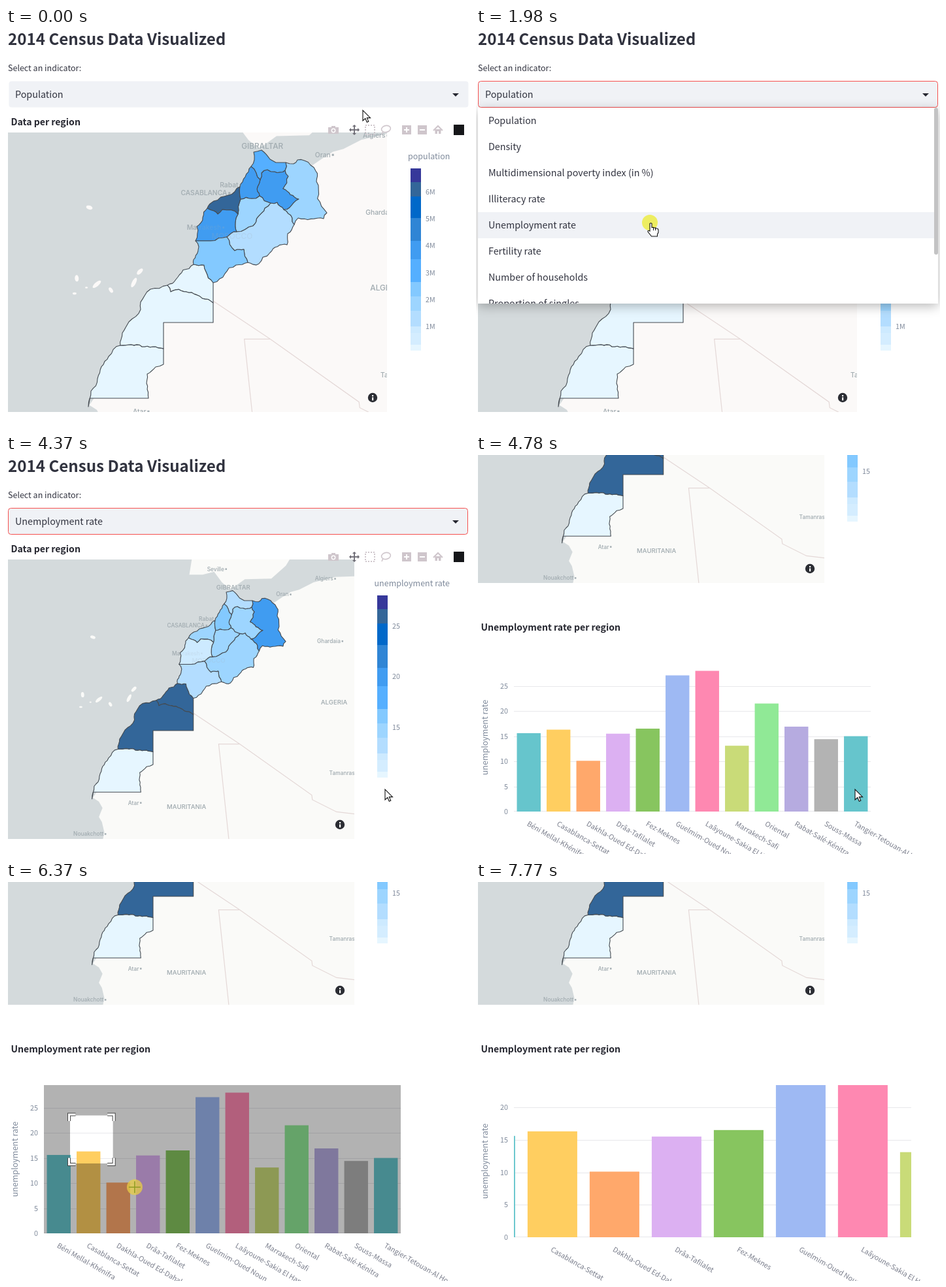
Recreate the animation shown at these times as an HTML page with a canvas. Size 710 by 611 pixels, loop 8000 ms.

```html
<!DOCTYPE html>
<html lang="en">
<head>
<meta charset="utf-8">
<title>2014 Census Data Visualized</title>
<style>
html, body { margin: 0; width: 100%; height: 100%; overflow: hidden; background: #fff; }
canvas { display: block; width: 710px; height: 611px; }
</style>
</head>
<body>
<canvas id="stage" width="710" height="611"></canvas>
<script>
const ctx = document.getElementById('stage').getContext('2d');
const LOOP = 8000;
const SANS = '"Noto Sans CJK JP", "Noto Sans CJK SC", "Noto Sans CJK", "Source Sans Pro", "Noto Sans", sans-serif';
const LABEL = 'Inter, "Open Sans", sans-serif';
const INK = '#31333f', MUTED = '#7f8a9b';

const clamp = (v, a = 0, b = 1) => Math.min(b, Math.max(a, v));
const ramp = (t, a, b) => clamp((t - a) / (b - a));
const smooth = u => u * u * (3 - 2 * u);

function text(s, x, y, size, color = INK, align = 'left', weight = 400) {
  ctx.font = `${weight} ${size}px ${SANS}`;
  ctx.fillStyle = color;
  ctx.textAlign = align;
  ctx.fillText(s, x, y);
}

function rect(x, y, w, h, color) {
  ctx.fillStyle = color;
  ctx.fillRect(x, y, w, h);
}

function line(color, width, ...p) {
  ctx.beginPath();
  for (let i = 0; i < p.length; i += 2) ctx.lineTo(p[i], p[i + 1]);
  ctx.strokeStyle = color;
  ctx.lineWidth = width;
  ctx.stroke();
}

function disc(x, y, r, color) {
  ctx.beginPath();
  ctx.arc(x, y, r, 0, 7);
  ctx.fillStyle = color;
  ctx.fill();
}

function group(fn) {
  ctx.save();
  fn();
  ctx.restore();
}

function clip(x, y, w, h) {
  ctx.beginPath();
  ctx.rect(x, y, w, h);
  ctx.clip();
}

// ---- data: name, jobless rate, population in millions, colour, corners on the map ----
const regions = [
  ['Béni Mellal-Khénifra', 15.6, 2.52, '#66c5cc', 'EFLKI'],
  ['Casablanca-Settat', 16.3, 6.86, '#ffce60', 'GFLM'],
  ['Dakhla-Oued Ed-Dahab', 10.1, 0.14, '#ffa86b', 'UVW'],
  ['Drâa-Tafilalet', 15.5, 1.64, '#dcb0f2', 'HJPNKI'],
  ['Fez-Meknes', 16.5, 4.24, '#87c55f', 'CHIED'],
  ['Guelmim-Oued Noun', 27.1, 0.43, '#9eb9f3', 'QRTS'],
  ['Laâyoune-Sakia El Hamra', 28, 0.37, '#fe88b1', 'STVU'],
  ['Marrakech-Safi', 13.1, 4.52, '#c9db78', 'MLKNO'],
  ['Oriental', 21.5, 2.31, '#90e996', 'BJHC'],
  ['Rabat-Salé-Kénitra', 16.9, 4.58, '#b6abe0', 'ADEFG'],
  ['Souss-Massa', 14.4, 2.68, '#b3b3b3', 'ONPRQ'],
  ['Tangier-Tetouan-Al Hoceima', 15, 3.56, '#66c5cc', 'ABCD']
].map(([name, rate, people, color, corners]) => ({ name, rate, people, color, corners }));

// ---- colour scale, from high to low ----
const shades = ['#36389a', '#336699', '#0068c9', '#2f85d5', '#409cf1', '#55afff',
  '#83c9ff', '#9dd5ff', '#b3ddff', '#cdeaff', '#d4edff', '#e6f6ff'];
const cuts = [0, 0.075, 0.155, 0.275, 0.4, 0.5, 0.625, 0.705, 0.785, 0.87, 0.905, 0.97, 1];

const views = [
  { key: 'people', title: 'population', tx: 615, bar: 619, step: 1, unit: 'M', w: 580, k: 1, dx: 0, dy: 0, land: '#fbf9f8' },
  { key: 'rate', title: 'unemployment rate', tx: 563.5, bar: 568, step: 5, unit: '', w: 530, k: 0.812, dx: 29.3, dy: 55.8, land: '#fafaf8' }
];
for (const v of views) {
  const all = regions.map(r => r[v.key]);
  v.hi = Math.max(...all);
  v.lo = Math.min(...all);
  v.depth = n => (v.hi - n) / (v.hi - v.lo);
  // Translucent fills on the map look one shade lighter than the scale.
  v.fill = n => shades[Math.min(cuts.findLastIndex(c => c <= v.depth(n)) + 1, 11)];
}

function colorBar(v) {
  const y = d => 215 + d * 278;
  text(v.title, v.tx, 201, 12.5, MUTED);
  shades.forEach((c, i) => rect(v.bar, Math.round(y(cuts[i])), 16, Math.ceil(y(cuts[i + 1]) - y(cuts[i])), c));
  for (let n = Math.ceil(v.lo / v.step) * v.step; n < v.hi; n += v.step)
    text(n + v.unit, v.bar + 23, y(v.depth(n)) + 4, 10.75, MUTED);
}

// ---- map ----
const points = s => s ? s.split(' ').map(p => p.split(',').map(Number)) : [];

// Mercator, longitude and latitude in degrees.
function project([lon, lat]) {
  const m = Math.log(Math.tan(Math.PI / 4 + lat * Math.PI / 360)) * 180 / Math.PI;
  return [514 + lon * 22.73, 1063.5 - m * 22.73];
}

let seed = 7;
function random() {
  seed = (seed * 16807) % 2147483647;
  return seed / 2147483647;
}

// Fractal line; edges along an axis stay straight.
function rough(a, b) {
  const dx = b[0] - a[0], dy = b[1] - a[1];
  if (!dx || !dy || Math.hypot(dx, dy) < 7) return [b];
  const n = (random() - 0.5) * 0.3;
  const mid = [a[0] + dx / 2 - dy * n, a[1] + dy / 2 + dx * n];
  return [...rough(a, mid), ...rough(mid, b)];
}

const corners = points('375,212 428,206 427,218 389,232 388,257 359,262 358,243 425,278 405,268 441,301 353,312 355,285 308,276 338,320 290,326 370,359 287,362 317,390 247,394 317,421 175,486 241,491 218,567');
const bends = {
  AB: '379,190 391,187 404,201 413,206', CD: '411,220 400,217 391,222', DA: '383,222', AG: '366,228',
  DE: '385,243', EF: '376,261', CH: '432,227 424,246 448,262 434,275', HI: '415,267',
  BJ: '440,208 446,202 466,210 474,219 475,235 491,283 486,292 447,291', JH: '438,291',
  IK: '396,276 378,303', JP: '431,315 430,332 404,344 393,351 387,361', PN: '364,339 350,341',
  LK: '351,297', ML: '318,280 324,285 331,278', GM: '340,256 318,265', MO: '301,290 292,304',
  ON: '313,326', OQ: '295,335', QR: '303,363 306,373', RP: '352,363', QS: '260,385',
  ST: '252,404 284,405', SU: '221,400 212,410 206,431 188,450 178,467', TV: '317,451 241,451',
  UV: '208,488', VW: '241,515 229,519 216,530', WU: '128,567 126,580 130,556 140,537 157,503'
};
const corner = c => corners[c.charCodeAt(0) - 65];
const arcs = {};

function arc(a, b) {
  if (arcs[b + a]) return [...arcs[b + a]].reverse();
  if (!arcs[a + b]) {
    const turns = bends[a + b] ? points(bends[a + b]) : points(bends[b + a]).reverse();
    const stops = [corner(a), ...turns, corner(b)];
    arcs[a + b] = stops.flatMap((p, i) => i ? rough(stops[i - 1], p) : [p]);
  }
  return arcs[a + b];
}

function shape(pts) {
  const path = new Path2D();
  pts.forEach(p => path.lineTo(...p));
  path.closePath();
  return path;
}

for (const r of regions) {
  const c = [...r.corners];
  r.path = shape(c.flatMap((a, i) => arc(a, c[(i + 1) % c.length])));
}

const coasts = [
  '-5.4,35.6 -4,35.1 -2.9,35.2 -2.1,35.05 -1.2,35.55 -0.6,35.85 0.1,36 1.3,36.5 3.1,36.85 5,36.9 9,37 9,14 -16.5,14 -16.5,16 -16.05,18.2 -16.25,19 -16.5,19.4 -16.2,20.1 -16.5,20.6 -17,20.9 -16.5,21.6 -13,24 -12.6,26.3 -9.5,28.7 -9,30.4 -8.5,32 -6,34.7',
  '-8.8,40 -8.8,38 -9,37 -7.9,37 -6.95,37.2 -6.3,36.5 -5.6,36 -4.4,36.7 -2.2,36.75 -1,37.6 -0.3,38.5 0,40'
].map(s => shape(points(s).map(project)));

// Islands: place, half length, tilt.
const islands = [[-18, 27.75, 3, 0], [-17.85, 28.65, 5, 1.5], [-17.2, 28.1, 2, 0], [-16.5, 28.3, 8, -0.7],
  [-15.55, 27.95, 4.5, 1], [-14, 28.4, 8, -1.1], [-13.6, 29.05, 6, -0.8], [-17, 32.75, 5, 0.3]];
const frontiers = ['-8.67,27.3 -4.83,25 1.15,21.1 1.2,20.74 3.2,19.8 6,19.5', '-4.83,25 -6.57,25 -5.6,16.5']
  .map(s => points(s).flatMap(project));
const cities = { Seville: [-5.98, 37.39], Algiers: [3.06, 36.75], Oran: [-0.63, 35.7], Rabat: [-6.84, 34.02],
  CASABLANCA: [-7.6, 33.58], Marrakesh: [-8, 31.63], Ghardaia: [3.67, 32.49], Tamanrasset: [5.52, 22.79],
  Atar: [-13.05, 20.52], Nouakchott: [-15.98, 18.08] };
const areas = { GIBRALTAR: [-5.36, 36.15], MOROCCO: [-7.4, 31.1], ALGERIA: [3, 28.1], MAURITANIA: [-9.24, 20.2] };

function placeNames() {
  ctx.fillStyle = '#a3adb2';
  ctx.textAlign = 'right';
  ctx.font = `500 10.3px ${LABEL}`;
  for (const s in cities) {
    const [x, y] = project(cities[s]);
    ctx.fillText(s, x - 3, y + 4);
    ctx.fillRect(x - 1, y - 1, 3, 3);
  }
  ctx.textAlign = 'center';
  ctx.font = `500 11.8px ${LABEL}`;
  for (const s in areas) {
    const [x, y] = project(areas[s]);
    ctx.fillText(s, x, y + 4);
  }
}

function drawMap(v, veil) {
  group(() => {
    clip(3, 160, v.w, 428);
    rect(3, 160, v.w, 428, '#d4dadc');
    if (veil > 0) rect(3, 160, 29, 428, `rgba(255,255,255,${veil})`);
    ctx.translate(v.dx, v.dy);
    ctx.scale(v.k, v.k);
    ctx.fillStyle = v.land;
    coasts.forEach(p => ctx.fill(p));
    for (const [lon, lat, r, tilt] of islands) {
      ctx.beginPath();
      ctx.ellipse(...project([lon, lat]), r, Math.min(r * 0.6, 3), tilt, 0, 7);
      ctx.fill();
    }
    frontiers.forEach(f => line('#e4d8d7', 1.2 / v.k, ...f));
    placeNames();
    ctx.strokeStyle = '#444a50';
    ctx.lineWidth = 1.1 / v.k;
    ctx.lineJoin = 'round';
    for (const r of regions) {
      ctx.fillStyle = v.fill(r[v.key]);
      ctx.fill(r.path);
      ctx.stroke(r.path);
    }
    ctx.globalAlpha *= 0.2;
    placeNames();
  });
  const x = v.w - 19;
  disc(x, 566, 7.2, '#2b2d33');
  rect(x - 1, 562, 2.2, 2.2, '#fff');
  rect(x - 1, 565.5, 2.2, 4.8, '#fff');
}

// ---- tool bar ----
function toolBar(y) {
  const pale = '#cfc6cc', dark = '#6c6a73';
  rect(493, y - 4, 16, 10, pale);
  rect(498, y - 6, 6, 3, pale);
  disc(501, y + 1, 3.4, '#fff');
  disc(501, y + 1, 2, pale);
  line(dark, 1.8, 526, y, 540, y);
  line(dark, 1.8, 533, y - 7, 533, y + 7);
  for (const [a, b] of [[1, 0], [-1, 0], [0, 1], [0, -1]]) {
    ctx.beginPath();
    ctx.moveTo(533 + a * 8, y + b * 8);
    ctx.lineTo(533 + a * 5 + b * 3, y + b * 5 + a * 3);
    ctx.lineTo(533 + a * 5 - b * 3, y + b * 5 - a * 3);
    ctx.fillStyle = dark;
    ctx.fill();
  }
  ctx.strokeStyle = pale;
  ctx.lineWidth = 2;
  ctx.setLineDash([2, 2]);
  ctx.strokeRect(550, y - 7, 14, 14);
  ctx.setLineDash([]);
  ctx.lineWidth = 1.6;
  ctx.beginPath();
  ctx.ellipse(581.5, y - 1.5, 7, 5, -0.2, 0, 7);
  ctx.moveTo(577, y + 2);
  ctx.lineTo(575, y + 7);
  ctx.stroke();
  for (const x of [606, 630]) {
    rect(x, y - 7, 14, 14, pale);
    rect(x + 3, y - 1, 8, 2, '#fff');
  }
  rect(612, y - 4, 2, 8, '#fff');
  line(pale, 2, 654, y + 1, 661, y - 6, 668, y + 1);
  rect(656.5, y - 1, 9, 3, pale);
  for (const x of [656.5, 662]) rect(x, y, 3.5, 6, pale);
  rect(685, y - 8, 16, 16, '#16171a');
}

// ---- bar chart ----
const LEFT = 58, TOP = 711;
const full = { x0: -0.5, x1: 11.5, max: 29.5, right: 604, bottom: 938 };
const zoomed = { x0: 0.38, x1: 6.78, max: 23.42, right: 666, bottom: 944 };

function selection([x, y, w, h], v) {
  ctx.beginPath();
  ctx.rect(LEFT, TOP, v.right - LEFT, v.bottom - TOP);
  ctx.rect(x, y, w, h);
  ctx.fillStyle = 'rgba(0,0,0,0.3)';
  ctx.fill('evenodd');
  const arm = Math.min(10, w / 2, h / 2);
  for (const [color, width] of [['#444', 5], ['#fff', 3]])
    for (const [cx, sx] of [[x - 1.5, 1], [x + w + 1.5, -1]])
      for (const [cy, sy] of [[y - 1.5, 1], [y + h + 1.5, -1]])
        line(color, width, cx + sx * arm, cy, cx, cy, cx, cy + sy * arm);
}

function drawChart(v, box) {
  const w = v.right - LEFT, h = v.bottom - TOP;
  const unit = w / (v.x1 - v.x0);
  const px = i => LEFT + (i - v.x0) * unit;
  const py = r => v.bottom - r * h / v.max;

  text('Unemployment rate per region', 7.5, 660.5, 14.1, '#262730', 'left', 700);
  for (let r = 0; r < v.max; r += 5) {
    rect(LEFT, Math.round(py(r)) - (r ? 0 : 1), w, 1, '#e8e8eb');
    text(r, 49, py(r) + 4, 10.75, MUTED, 'right');
  }
  group(() => {
    clip(LEFT, TOP, w, h);
    regions.forEach((r, i) => rect(px(i - 0.4), py(r.rate), unit * 0.8, v.bottom - py(r.rate), r.color));
  });
  if (box) selection(box, v);
  regions.forEach((r, i) => {
    if (i < v.x0 || i > v.x1) return;
    group(() => {
      ctx.translate(px(i) - 3.5, v.bottom + 21);
      ctx.rotate(Math.PI / 6);
      text(r.name, 0, 0, 10.75, '#797d8b');
    });
  });
  group(() => {
    ctx.translate(18, (TOP + v.bottom) / 2);
    ctx.rotate(-Math.PI / 2);
    text('unemployment rate', 0, 0, 12.5, MUTED, 'center');
  });
}

// ---- select box ----
const options = ['Population', 'Density', 'Multidimensional poverty index (in %)', 'Illiteracy rate',
  'Unemployment rate', 'Fertility rate', 'Number of households', 'Proportion of singles'];

function selectBox(t, value, focus) {
  ctx.beginPath();
  ctx.roundRect(focus ? 3.5 : 4.5, 81.5, 703, 40, 4);
  ctx.fillStyle = '#f0f2f6';
  ctx.fill();
  if (focus) {
    ctx.strokeStyle = '#f5504f';
    ctx.lineWidth = 1;
    ctx.stroke();
  }
  text(value, 14, 107, 14.32);
  ctx.beginPath();
  ctx.moveTo(683, 100);
  ctx.lineTo(693, 100);
  ctx.lineTo(688, 105);
  ctx.fillStyle = '#262730';
  ctx.fill();
  if (t >= 2370 && t < 4490 && Math.floor((t - 2370) / 530) % 2 === 0) rect(150, 92, 1, 20, INK);
}

function dropdown(t, y) {
  const hover = clamp(Math.floor((y - 122) / 40), 0, 7);
  group(() => {
    ctx.globalAlpha = ramp(t, 480, 600);
    group(() => {
      ctx.shadowColor = 'rgba(0,0,0,0.28)';
      ctx.shadowBlur = 16;
      ctx.shadowOffsetY = 4;
      rect(3, 122, 704, 300, '#fff');
    });
    clip(3, 122, 704, 300);
    rect(3, 122 + hover * 40, 698, 40, '#f0f2f6');
    options.forEach((s, i) => text(s, 19, 147 + i * 40, 14.32));
    ctx.beginPath();
    ctx.roundRect(701, 122, 6, 225, 3);
    ctx.fillStyle = '#c3c3c4';
    ctx.fill();
  });
}

// ---- pointer: time, x, y ----
const trail = [
  [0, 546, 126], [70, 546, 126], [420, 440, 104], [960, 440, 104], [1720, 266, 298], [3260, 266, 298],
  [4300, 580, 512], [4980, 580, 512], [5750, 98, 358], [6170, 98, 358], [6370, 196, 467],
  [6580, 390, 538], [6680, 390, 538], [7700, 107, 365], [LOOP, 107, 365]
];

function pointerAt(t) {
  const i = Math.max(1, trail.findIndex(k => k[0] > t));
  const [a, b] = [trail[i - 1], trail[i]];
  const u = ramp(t, a[0], b[0]);
  const e = t > 6170 && t < 6580 ? u : smooth(u);
  return [a[1] + (b[1] - a[1]) * e, a[2] + (b[2] - a[2]) * e];
}

const arrow = new Path2D('M0 0V16L3.8 12.5L6.3 18.3L8.8 17.2L6.4 11.6H11.5Z');
const hand = new Path2D('M-1.5 1.5Q0 0 1.5 1.5V7.5L4 7.2L5 8L7.5 8L8.5 9L10.5 9.3L11.5 11V15L10 18V21H1L-4.5 14Q-5 11 -1.5 13Z');

function pointer(t) {
  if (t >= 7740) return;
  const [x, y] = pointerAt(t);
  const cross = t >= 4980;
  const pressed = (t > 390 && t < 520) || (t >= 1950 && t < 2050) || (t > 6120 && t < 6600);
  if (pressed) disc(x, y, 12, cross ? 'rgba(232,205,70,0.75)' : 'rgba(236,236,70,0.85)');
  if (cross) {
    const c = pressed ? '#8f9a22' : '#333';
    line(c, 1.5, x - 9, y, x + 9, y);
    line(c, 1.5, x, y - 9, x, y + 9);
    return;
  }
  group(() => {
    const useHand = t > 150 && t < 2050;
    const form = useHand ? hand : arrow;
    ctx.translate(x + (useHand ? 1.5 : 0), y);
    ctx.fillStyle = '#fff';
    ctx.strokeStyle = '#111';
    ctx.lineWidth = 1.1;
    ctx.fill(form);
    ctx.stroke(form);
    if (useHand) [4, 7].forEach(k => line('#111', 1, k, 8, k, 12));
  });
}

// ---- page ----
function draw(t) {
  const scroll = 400 * (1 - Math.pow(1 - ramp(t, 4440, 4850), 2.2));
  const chosen = t >= 2050;
  const swapped = t >= 2110;
  const view = views[swapped ? 1 : 0];
  rect(0, 0, 710, 611, '#fff');
  group(() => {
    ctx.translate(0, -Math.round(scroll));
    text('2014 Census Data Visualized', 3, 25.5, 24.15, INK, 'left', 700);
    text('Select an indicator:', 3, 66, 12.5);
    selectBox(t, options[chosen ? 4 : 0], t >= 430);
    text('Data per region', 7.5, 149, 14.1, '#262730', 'left', 700);
    group(() => {
      if (swapped) ctx.globalAlpha = ramp(t, 2740, 2980);
      drawMap(view, swapped ? 0.42 * (1 - ramp(t, 3080, 3190)) : 0);
    });
    colorBar(view);
    toolBar(156);

    let box = null;
    if (t > 6240 && t < 6640) {
      const [x, y] = pointerAt(t - 67);
      box = [98, 757.5, Math.max(1, x - 98), Math.max(1, Math.min(y, 538) - 357.5)];
    }
    drawChart(t < 6640 ? full : zoomed, box);
    group(() => {
      ctx.globalAlpha = ramp(t, 4980, 5150) * (1 - ramp(t, 6050, 6170)) + ramp(t, 6650, 6800) * (1 - ramp(t, 7600, 7750));
      toolBar(629);
    });
  });
  if (t >= 480 && !chosen) dropdown(t, pointerAt(t)[1]);
  pointer(t);
}

const start = performance.now();
function tick() {
  draw((performance.now() - start) % LOOP);
  requestAnimationFrame(tick);
}
tick();
</script>
</body>
</html>
```
